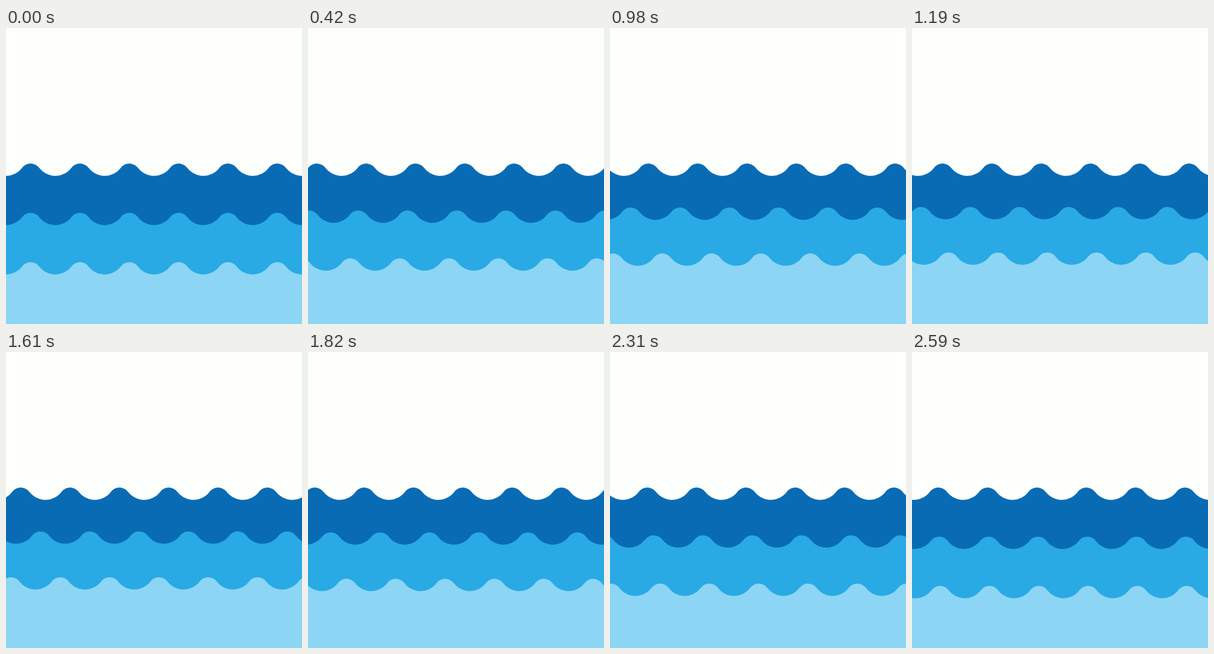
Recreate the animation shown at these times as an HTML page with a canvas. Size 498 by 498 pixels, loop 2660 ms.

```html
<!DOCTYPE html>
<html lang="en">
<head>
<meta charset="utf-8">
<title>Waves</title>
<style>
  html, body { margin: 0; width: 100%; height: 100%; overflow: hidden; background: #fdfffc; }
  canvas { display: block; }
</style>
</head>
<body>
<canvas id="stage" width="498" height="498"></canvas>
<script>
const ctx = document.getElementById('stage').getContext('2d');
const SIZE = 498, STEP = 70, STEPS = 38;
const PERIOD = SIZE / 6, HALF = PERIOD / 2, DEPTH = 20.7;

// Crest and trough are circular arcs that meet at a common tangent.
const RADII = (HALF * HALF + DEPTH * DEPTH) / (2 * DEPTH);
const CREST = 18, TROUGH = RADII - CREST;
const SPREAD = Math.asin(HALF / RADII);

const layers = [
  { color: '#0a6bb5', y: 228.1, lift: 0, cycles: 2 },
  { color: '#29aae4', y: 311, lift: 10, cycles: 3 },
  { color: '#8cd5f5', y: 394, lift: 16.5, cycles: 4 },
];

// Drift progress: step number, then position out of 75.
const drift = [[0, 0], [6, 12], [11, 21], [29, 57], [37, 73.7], [38, 75]];

function driftAt(step) {
  const i = drift.findIndex(([s]) => s > step);
  const [s0, p0] = drift[i - 1], [s1, p1] = drift[i];
  return (p0 + (p1 - p0) * (step - s0) / (s1 - s0)) / 75;
}

function liftAt(progress) {
  const s = Math.sin(Math.PI * progress ** 0.96);
  return s * (1 + s) / 2;
}

function drawWave(color, x, y) {
  const up = -Math.PI / 2, down = Math.PI / 2;
  ctx.fillStyle = color;
  ctx.beginPath();
  for (let cx = x - 2 * PERIOD; cx < SIZE + PERIOD; cx += PERIOD) {
    ctx.arc(cx, y + CREST, CREST, up - SPREAD, up + SPREAD);
    ctx.arc(cx + HALF, y + DEPTH - TROUGH, TROUGH, down + SPREAD, down - SPREAD, true);
  }
  ctx.lineTo(SIZE + 2 * PERIOD, SIZE);
  ctx.lineTo(-2 * PERIOD, SIZE);
  ctx.fill();
}

function render() {
  const step = Math.floor(performance.now() / STEP) % STEPS;
  const progress = driftAt(step), lift = liftAt(progress);
  ctx.fillStyle = '#fdfffc';
  ctx.fillRect(0, 0, SIZE, SIZE);
  for (const layer of layers) {
    const shift = (progress * layer.cycles % 1) * PERIOD;
    drawWave(layer.color, HALF - shift, layer.y - layer.lift * lift);
  }
  requestAnimationFrame(render);
}
render();
</script>
</body>
</html>
```
